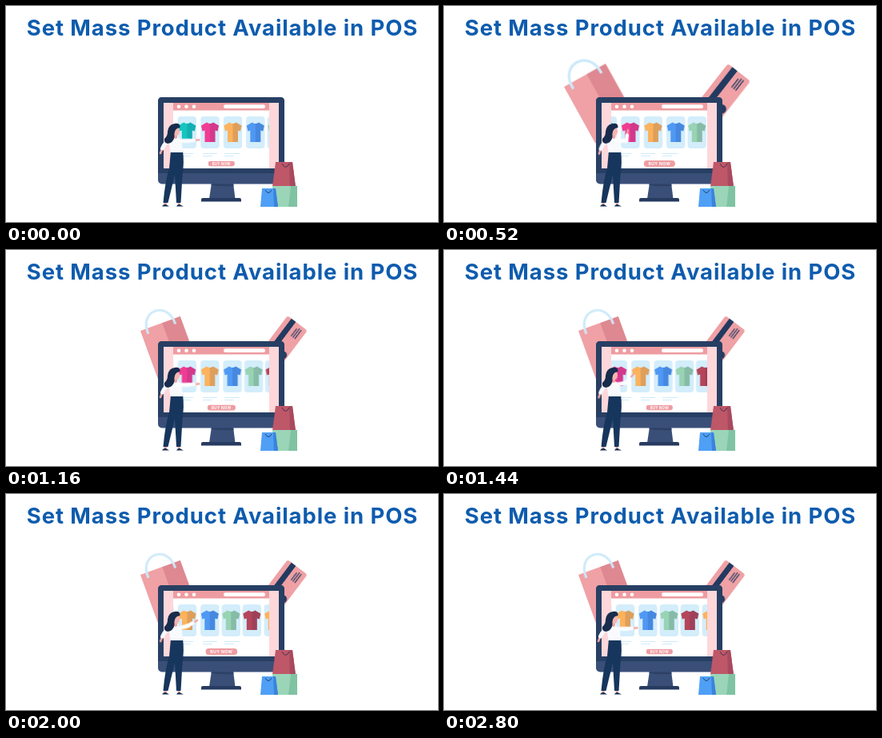
An HTML page without scripts for the animation above (2.84 s loop, 540 px wide and 270 px high).

```html
<!DOCTYPE html>
<html lang="en">
<head>
<meta charset="utf-8">
<title>Set Mass Product Available in POS</title>
<style>
  html, body { margin: 0; width: 100%; height: 100%; overflow: hidden; background: #fff; }
  svg { display: block; width: 540px; height: 270px; }
  text { font-family: Inter, "Open Sans", sans-serif; font-weight: 700; text-anchor: middle; }
  .title { font-size: 27.5px; letter-spacing: .9px; fill: #0e5cae; }

  .bag, .card, .track, .upper, .fore, .rear { animation: 2840ms ease-in-out infinite; }
  .bag { animation-name: bag; }
  .card { animation-name: card; }
  .track { animation-name: slide; }
  .upper { animation-name: upper; }
  .fore { animation-name: fore; }
  .rear { animation-name: rear; }
  .buy { animation: pulse 710ms cubic-bezier(.37, 0, .63, 1) infinite alternate; }

  @keyframes bag {
    0%, 4% { transform: translate(225px, 145px) rotate(0deg) scale(.6); }
    13% { transform: translate(168px, 93px) rotate(-20deg) scale(1.15); }
    18.3% { transform: translate(150px, 101px) rotate(-29deg) scale(1.12); }
    23.9% { transform: translate(156px, 102px) rotate(-26deg) scale(1.06); }
    29.6% { transform: translate(166px, 102px) rotate(-22deg); }
    40%, 100% { transform: translate(168px, 101px) rotate(-20deg); }
  }
  @keyframes card {
    0%, 4% { transform: translate(290px, 135px) rotate(30deg) scale(.5); }
    18.3% { transform: translate(355px, 72px) rotate(38deg) scale(1.15); }
    23.9% { transform: translate(362px, 76px) rotate(38deg) scale(1.1); }
    29.6% { transform: translate(360px, 80px) rotate(38deg) scale(1.04); }
    40%, 100% { transform: translate(352px, 82px) rotate(37deg); }
  }
  @keyframes slide {
    0%, 7% { transform: translateX(0); }
    24%, 44.4% { transform: translateX(-28.7px); }
    60.6%, 100% { transform: translateX(-57px); }
  }
  @keyframes upper {
    0%, 4.2% { transform: rotate(0deg); }
    9% { transform: rotate(-15deg); }
    17%, 30% { transform: rotate(0deg); }
    35% { transform: rotate(-14deg); }
    40%, 43.6% { transform: rotate(0deg); }
    48% { transform: rotate(-15deg); }
    55%, 60% { transform: rotate(0deg); }
    70.4% { transform: rotate(-16deg); }
    76%, 100% { transform: rotate(0deg); }
  }
  @keyframes fore {
    0%, 4.2% { transform: rotate(-5deg); }
    9% { transform: rotate(-20deg); }
    17%, 30% { transform: rotate(-82deg); }
    35% { transform: rotate(-22deg); }
    40%, 43.6% { transform: rotate(-5deg); }
    48% { transform: rotate(-20deg); }
    55%, 60% { transform: rotate(-82deg); }
    70.4% { transform: rotate(-14deg); }
    76%, 100% { transform: rotate(-5deg); }
  }
  @keyframes rear {
    0%, 4.2%, 40%, 43.6%, 76%, 100% { transform: rotate(0deg); }
    20%, 58% { transform: rotate(-3deg); }
  }
  @keyframes pulse {
    from { transform: scale(.83); }
    to { transform: scale(1.01); }
  }
</style>
</head>
<body>
<svg viewBox="0 0 540 270">
  <defs>
    <clipPath id="page"><rect x="209" y="121" width="120" height="82"/></clipPath>
    <g id="item">
      <rect x="-11.7" y="-20" width="23.4" height="40" rx="4" fill="#d3edfb"/>
      <path d="M-4-12.5-11-8.5-9.5-1.5-6.5-2.5V12H6.5V-2.5L9.5-1.5 11-8.5 4-12.5Q0-9.5-4-12.5Z"/>
      <path d="M0-11Q2.500-11 4-12.500L11-8.500 9.500-1.500 6.500-2.500V12H0Z" fill="#102060" opacity=".13"/>
    </g>
  </defs>

  <text class="title" x="270.500" y="37">Set Mass Product Available in POS</text>

  <g class="bag">
    <path d="M0 0H53V72H0Z" fill="#efa1a5"/>
    <path d="M29 0H53V72H29Z" fill="#de8891"/>
    <path d="M8 7C6-25 45-25 44 7" fill="none" stroke="#cdeafa" stroke-width="3"/>
  </g>

  <g class="card">
    <rect width="31" height="70" rx="3" fill="#efa1a5"/>
    <path d="M6 0H13V70H6Z" fill="#233a60"/>
    <path d="M19 6V18M21.800 4V18M24.600 4V18" stroke="#233a60" stroke-width="1.200"/>
    <circle cx="25" cy="43" r="5" fill="#233a60"/>
  </g>

  <!-- Monitor -->
  <path d="M257 221H284L286.500 241H254Z" fill="#3a4f78"/>
  <path d="M257 221H284L284.500 225Q270 226 256.500 224Z" fill="#2d4167"/>
  <path d="M244 244.500V242Q244 240 246 240H292Q294 240 294 242V244.500Z" fill="#273b60"/>
  <rect x="190" y="114" width="158" height="108.500" rx="5" fill="#3a4f78"/>
  <path d="M190 209V119Q190 114 195 114H343Q348 114 348 119V209Z" fill="#273f63"/>
  <rect x="197" y="121" width="144" height="82" fill="#fdd7da"/>
  <rect x="209" y="121" width="120" height="82" fill="#fff"/>
  <rect x="209" y="121" width="120" height="9.500" fill="#ee9ca1"/>
  <g fill="#fff">
    <circle cx="216" cy="125.700" r="2.300"/>
    <circle cx="225.500" cy="125.700" r="2.300"/>
    <circle cx="235" cy="125.700" r="2.300"/>
    <rect x="272" y="123.300" width="52" height="4.800" rx="2.400"/>
  </g>

  <g clip-path="url(#page)">
    <g class="track">
      <use href="#item" x="226.300" y="158" fill="#15c5bf"/>
      <use href="#item" x="255" y="158" fill="#f03c92"/>
      <use href="#item" x="283.500" y="158" fill="#fdb25c"/>
      <use href="#item" x="311.800" y="158" fill="#4f98f3"/>
      <use href="#item" x="338.300" y="158" fill="#98d3b3"/>
      <use href="#item" x="364.300" y="158" fill="#b5455a"/>
      <use href="#item" x="391.300" y="158" fill="#fdb25c"/>
    </g>
  </g>
  <path d="M219 184.500H234M219 187.500H231M246 184.500H264M246 187.500H258M273 184.500H292M273 187.500H285" stroke="#cfeafa" stroke-width="1.200"/>

  <g transform="translate(269.300 197)">
    <g class="buy">
      <rect x="-20" y="-4" width="40" height="8" rx="4" fill="#ee9ca1"/>
      <text y="2" font-size="5.300" letter-spacing=".3" fill="#fff">BUY NOW</text>
    </g>
  </g>

  <!-- Shopping bags -->
  <path d="M337 195H358L362 226H333Z" fill="#be5768"/>
  <path d="M354 195H358L362 226H355Z" fill="#a84a5d"/>
  <path d="M345 197Q349.500 206 354 197" fill="none" stroke="#443052"/>
  <path d="M333 225H364V251H333Z" fill="#9ad5b8"/>
  <path d="M356 225H364V251H353Z" fill="#80c3a3"/>
  <path d="M320 228H337L340 251H318Z" fill="#4f9ff5"/>
  <path d="M334 228H337L340 251H335Z" fill="#3a83dc"/>
  <path d="M324 230Q328 237 332 230" fill="none" stroke="#24436f"/>

  <!-- Shopper -->
  <g transform="translate(205 167)">
    <g class="rear" fill="none" stroke-linecap="round">
      <path d="M-10 12-12 17" stroke="#f2a6a3" stroke-width="2.600"/>
      <path d="M0 1Q-7 4-9.500 11" stroke="#f7f8fc" stroke-width="5"/>
    </g>
  </g>
  <path d="M198 244H201L200.500 249H197ZM214 244H217L218 249H215Z" fill="#f2a6a3"/>
  <path d="M195 250.500Q196 247.500 200 248L204 250.500ZM213 250.500Q214 247.500 217 248L222 250.500Z" fill="#172b4b"/>
  <path d="M206 181H221Q223 195 220.500 212L218.500 246H213L211 211 202.500 246H196.500Q199 218 204 203Z" fill="#17365d"/>
  <path d="M203 166Q209 162 216 165L220 171 221 183H205.500Z" fill="#f9fafd"/>
  <path d="M210 158H214V165Q212 167 210 165Z" fill="#f2a6a3"/>
  <ellipse cx="213" cy="156.500" rx="4" ry="5.500" fill="#f7b5b0"/>
  <path d="M217.500 152Q218 146 211 147Q203 148 202 157Q202 163 198 166Q197 171 202 172Q209 171 210.500 164Q209.500 156 214 153Z" fill="#182c4d"/>

  <g transform="translate(214 168.500)">
    <g class="upper" stroke-linecap="round">
      <g transform="translate(14 0)">
        <g class="fore">
          <path d="M8 0H13.500" stroke="#f2a6a3" stroke-width="2.400"/>
          <path d="M0 0H7" stroke="#fbfcfe" stroke-width="4.500"/>
        </g>
      </g>
      <path d="M0 0H14" stroke="#fbfcfe" stroke-width="5"/>
    </g>
  </g>
</svg>
</body>
</html>
```
